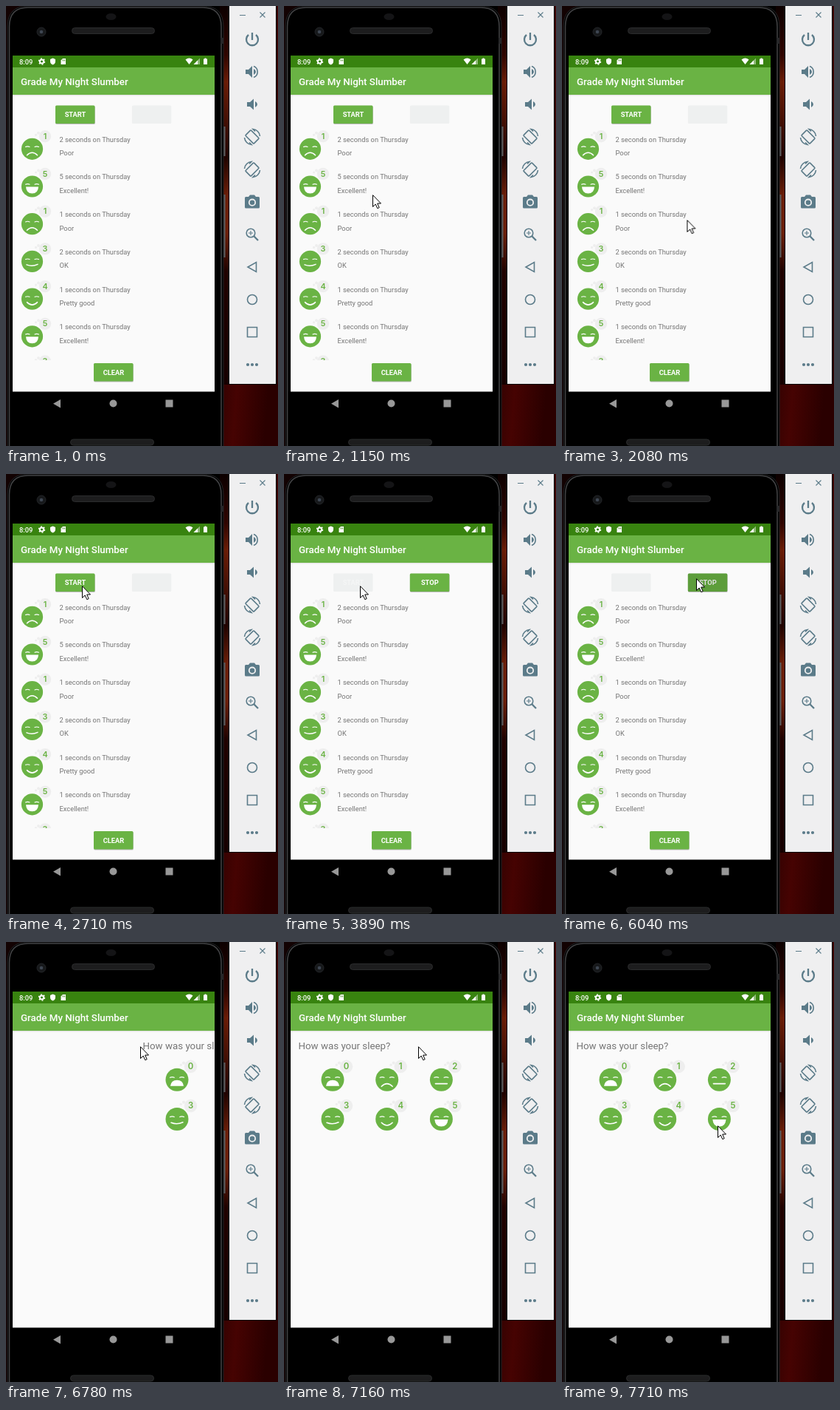
Recreate the animation shown at these times as an HTML page. Size 369 by 595 pixels, loop 8 s.

```html
<!DOCTYPE html>
<html lang="en">
<head>
<meta charset="utf-8">
<title>Sleep log</title>
<style>
html, body { margin: 0; width: 100%; height: 100%; overflow: hidden; background: #000; }
svg { display: block; width: 369px; height: 595px; font: 9.33px Roboto, sans-serif; }
.anim { animation: 8s step-end infinite; }
.caps { font-weight: 700; fill: #fff; text-anchor: middle; }
.digit { font: 600 10.8px Inter, sans-serif; fill: #6ab344; text-anchor: middle; }
.grey { fill: #757575; }
.line { fill: none; stroke: #5b7b89; stroke-width: 1.6; }
.bold { stroke-width: 2.3; }
.thin { stroke-width: 1.1; }
.solid { fill: #5b7b89; }
.feature { fill: none; stroke: #fff; stroke-width: 1.5; stroke-linecap: round; }
.eyes { stroke-width: 1.1; }

#list { animation-name: list; }
#rate { animation-name: slide; }
#start .on { animation-name: start-on; }
#start .ripple { animation-name: start-ripple; }
#start .off-label { animation-name: off-label; }
#stop .on { animation-name: stop-on; }
#stop .ripple { animation-name: stop-ripple; }
#cursor { animation-name: move; }
#halo { animation-name: click; }

@keyframes list { 0% { visibility: visible; } 77.375%, 100% { visibility: hidden; } }
@keyframes slide {
  0% { transform: translateX(300px); }
  81.125% { transform: translateX(255px); }
  82.375% { transform: translateX(231px); }
  84.75% { transform: translateX(166px); }
  86.875% { transform: translateX(98px); }
  89.5%, 100% { transform: none; }
}
@keyframes start-on { 0% { opacity: 1; } 47.875% { opacity: .4; } 48.625%, 100% { opacity: 0; } }
@keyframes stop-on { 0% { opacity: 0; } 47.875% { opacity: .6; } 48.625%, 100% { opacity: 1; } }
@keyframes start-ripple { 0% { opacity: 0; } 44.75%, 100% { opacity: .12; } }
@keyframes stop-ripple {
  0% { opacity: 0; } 72.875% { opacity: .05; } 74.2% { opacity: .09; } 75.5%, 100% { opacity: .12; }
}
@keyframes off-label { 0% { opacity: 1; } 52.5%, 100% { opacity: 0; } }
@keyframes click {
  0% { opacity: 0; } 37.625% { opacity: 1; } 40.75% { opacity: 0; }
  65.125% { opacity: 1; } 67.5%, 100% { opacity: 0; }
}
@keyframes move {
  0% { transform: translate(234px, 700px); }
  4.5% { transform: translate(234px, 562px); animation-timing-function: steps(5); }
  9.4375% { transform: translate(104px, 370px); animation-timing-function: steps(3); }
  12.4% { transform: translate(80px, 280px); }
  13.3875% { transform: translate(104px, 252px); }
  14.375% { transform: translate(120px, 255px); }
  15.375% { transform: translate(138px, 273px); animation-timing-function: steps(3); }
  18.125% { transform: translate(184px, 320px); }
  25% { transform: translate(179px, 309px); animation-timing-function: steps(5); }
  29.925% { transform: translate(131px, 209px); animation-timing-function: steps(4); }
  33.875% { transform: translate(103px, 151px); }
  52.5% { transform: translate(110px, 150px); animation-timing-function: steps(7); }
  59.5% { transform: translate(182px, 140px); }
  65.125% { transform: translate(182px, 141px); }
  91.5% { transform: translate(185px, 152px); animation-timing-function: steps(6); }
  96.375%, 100% { transform: translate(211px, 248px); }
}
</style>
</head>
<body>
<svg viewBox="0 0 369 595">
  <defs>
    <linearGradient id="wall" x1="0" y1="0" x2="1" y2=".6">
      <stop offset="0" stop-color="#120000"/><stop offset=".6" stop-color="#460302"/><stop offset="1" stop-color="#2a0000"/>
    </linearGradient>
    <linearGradient id="gap" x1="0" y1="0" x2="0" y2="1">
      <stop offset="0" stop-color="#0c0000"/><stop offset=".13" stop-color="#300500"/>
      <stop offset=".2" stop-color="#6a1c06"/><stop offset=".3" stop-color="#461004"/>
      <stop offset=".4" stop-color="#200300"/><stop offset=".5" stop-color="#6a1e08"/>
      <stop offset=".6" stop-color="#6a1e08"/><stop offset=".7" stop-color="#200200"/><stop offset="1" stop-color="#160000"/>
    </linearGradient>
    <linearGradient id="shade" x1="0" y1="0" x2="0" y2="1">
      <stop offset="0" stop-opacity=".12"/><stop offset="1" stop-opacity="0"/>
    </linearGradient>
    <clipPath id="screen"><path d="M9 120H283V521.500H9Z"/></clipPath>
    <clipPath id="rows-clip"><path d="M9 160H283V479H9Z"/></clipPath>
    <g id="rotate" class="line">
      <rect x="-5.200" y="-8" width="10.400" height="16" rx="1" transform="rotate(-45)"/>
      <path class="line" d="M10.500 -1A10.500 10.500 0 0 0 1 -10.500L4 -7.500M-10.500 1A10.500 10.500 0 0 0 -1 10.500L-4 7.500"/>
    </g>
  </defs>

  <path d="M290 0H369V595H290Z" fill="url(#wall)"/>
  <path d="M290 0H304V512H290Z" fill="url(#gap)"/>
  <path d="M0 0H30V595H0Z" fill="#120202"/>

  <!-- phone -->
  <path d="M294 163h3.500v40H294zM294 255h3.500v85H294z" fill="#5d5d5f"/>
  <path d="M2 595V28Q2 0 30 0H267Q295 0 295 28V595" fill="#000" stroke="#222325"/>
  <path d="M4.500 595V28Q4.500 2 30 2H267Q292 2 292 28V595" fill="none" stroke="#434446" stroke-width="1.500"/>
  <path d="M291 43h4v8h-4z" fill="#27282a"/>
  <ellipse cx="142.500" cy="14.500" rx="7" ry="4.500" fill="#141416"/>
  <circle cx="48" cy="35" r="6" fill="#17191b" stroke="#232528"/>
  <circle cx="48" cy="35" r="2.300" fill="#3e4652"/>
  <rect x="89.500" y="29.500" width="112" height="8" rx="4" fill="#1d1d1e" stroke="#2b2c2d"/>
  <rect x="87.500" y="586" width="113" height="8" rx="4" fill="#1d1d1e" stroke="#2b2c2d"/>

  <!-- screen -->
  <path d="M9 120H283V521.500H9Z" fill="#fafafa"/>
  <path d="M9 67H283V83H9Z" fill="#38830f"/>
  <path d="M9 83H283V120H9Z" fill="#6ab344"/>
  <path d="M9 120H283V122H9Z" fill="url(#shade)"/>
  <g fill="#fff" font-weight="500">
    <text x="18" y="78.500">8:09</text>
    <text x="20" y="106.800" font-size="13.330">Grade My Night Slumber</text>
    <circle cx="48.500" cy="75" r="2.600" fill="none" stroke="#fff" stroke-width="2"/>
    <circle cx="48.500" cy="75" r="4" fill="none" stroke="#fff" stroke-width="1.400" stroke-dasharray="1.900 2.290"/>
    <path d="M63.500 70.500L67 72V75Q67 78 63.500 79.500Q60 78 60 75V72Z"/>
    <path d="M77 71H81V79H74.500V73.500Z"/>
    <path d="M76.800 72.500v2M78.300 72.500v2M79.700 72.500v2" stroke="#38830f" stroke-width=".700"/>
    <path d="M243.500 72.500Q248.500 68.500 253.500 72.500L248.500 79Z"/>
    <path d="M263 70.500V79H254.500Z" opacity=".45"/><path d="M260 73.500V79H254.500Z"/>
    <path d="M268 71.500h1.500v-1h2v1H273V79h-5z"/>
  </g>
  <g fill="#989898">
    <path d="M74 532V543.500L64 537.700Z"/><circle cx="145.500" cy="537.500" r="5"/><path d="M216.500 532.500h10v10h-10z"/>
  </g>

  <g clip-path="url(#screen)">
    <g id="list" class="anim">
      <g id="start"></g><g id="stop"></g><g id="clear"></g>
      <g id="rows" clip-path="url(#rows-clip)"></g>
    </g>
    <g id="rate" class="anim">
      <text class="grey" x="19.500" y="145" font-size="13.330">How was your sleep?</text>
      <g id="grid"></g>
    </g>
  </g>

  <!-- emulator toolbar -->
  <path d="M302 0H367V512H302Z" fill="#080202"/>
  <path d="M303 0H366V511H303Z" fill="#efeff0"/>
  <path class="line thin" d="M317 12.500h8M344.500 8.500l7 7M351.500 8.500l-7 7"/>
  <g transform="translate(334 45)"><path class="line bold" d="M0 -9V1M-5 -6A8 8 0 1 0 5 -6"/></g>
  <g transform="translate(334 89)">
    <path class="solid" d="M-9 -3H-5L0 -8V8L-5 3H-9Z"/>
    <path class="solid" d="M2 -4Q5 -2.500 5 0T2 4Z"/><path class="line" d="M2 -7.500A8 8 0 0 1 2 7.500"/>
  </g>
  <g transform="translate(334 133)">
    <path class="solid" d="M-7 -3H-3L2 -7.500V7.500L-3 3H-7Z"/><path class="solid" d="M4 -4Q7 -2.500 7 0T4 4Z"/>
  </g>
  <use href="#rotate" transform="translate(334 177)"/>
  <use href="#rotate" transform="translate(334 221) scale(-1 1)"/>
  <g transform="translate(334 265)">
    <path class="solid" d="M-8.500 -7H-5L-3 -9.500H3L5 -7H8.500Q10 -7 10 -5.500V7Q10 8.500 8.500 8.500H-8.500Q-10 8.500 -10 7V-5.500Q-10 -7 -8.500 -7Z"/>
    <circle r="4.200" cy=".700" fill="none" stroke="#efeff0" stroke-width="1.800"/>
  </g>
  <g transform="translate(332 307)" class="line">
    <circle r="5.800"/><path class="bold" d="M4.300 4.300L10 10"/><path class="thin" d="M-3 0H3M0 -3V3"/>
  </g>
  <path class="line" d="M339.500 346.500V359.500L328 353Z"/>
  <circle class="line" cx="334" cy="397" r="6.500"/>
  <path class="line" d="M327.500 434.500h13v13h-13z"/>
  <g class="solid"><circle cx="328" cy="485" r="2.100"/><circle cx="334" cy="485" r="2.100"/><circle cx="340" cy="485" r="2.100"/></g>

  <g id="cursor" class="anim">
    <circle id="halo" class="anim" r="12" fill="#ff0" fill-opacity=".47"/>
    <path d="M.500 .700V16.500L4.200 13L6.800 18.700L9.200 17.600L6.700 12H11.500Z" fill="#fff" stroke="#000"/>
  </g>
</svg>
<script>
const $ = id => document.getElementById(id);
const line = d => `<path class="feature" d="${d}"/>`;
const fill = d => `<path fill="#fff" d="${d}"/>`;

const mouths = [
  fill('M-8.5 8Q-7.5 .5 0 .5T8.5 8Z'),
  line('M-7 8.5Q0 1.5 7 8.5'),
  line('M-7.5 5H7.5'),
  line('M-7.5 4.5Q0 7.5 7.5 4'),
  line('M-7 4.5Q0 11.5 7 4.5'),
  fill('M-8.5 .5H8.5Q8 9.5 0 9.5T-8.5 .5Z')
];
const eyes = '<path class="feature eyes" d="M-9 -2.8Q-6 -4 -3.500 -2.800M3.500 -2.800Q6 -4 9 -2.800"/>';

const face = (score, x, y, size = 1) => `
  <g transform="translate(${x} ${y}) scale(${size})">
    <circle cx="5" cy="-19" r="1.6" fill="#eee"/><circle cx="8.5" cy="-21.5" r="2" fill="#eee"/>
    <circle cx="17.5" cy="-17" r="8.2" fill="#eee"/>
    <text class="digit" x="17.5" y="-13.4">${score}</text>
    <circle r="14.6" fill="#6ab344"/>${eyes}${mouths[score]}
  </g>`;

const button = (label, x, y, off) => {
  const box = `x="${x}" y="${y}" width="53.5" height="24.5" rx="1.5"`;
  const text = `<text class="caps" x="${x + 27}" y="${y + 15.5}">${label}</text>`;
  return `<rect ${box} fill="#eef0f0"/>
    ${off ? `<g class="anim off-label" fill-opacity=".4">${text}</g>` : ''}
    <g class="anim on">
      <rect ${box} transform="translate(.3 1)" fill-opacity=".25"/>
      <rect ${box} fill="#6ab344"/>${text}
      <rect class="anim ripple" ${box} opacity="0"/>
    </g>`;
};

$('start').innerHTML = button('START', 67, 134.5, true);
$('stop').innerHTML = button('STOP', 170.8, 134.5);
$('clear').innerHTML = button('CLEAR', 119, 483);

const words = ['Very bad', 'Poor', 'So-so', 'OK', 'Pretty good', 'Excellent!'];
const nights = [[2, 1], [5, 5], [1, 1], [2, 3], [1, 4], [1, 5], [2, 3]];
$('rows').innerHTML = nights.map(([secs, score], i) => {
  const y = 193.3 + i * 50.7;
  return `${face(score, 35.5, y)}
    <text class="grey" x="72.5" y="${y - 9.6}">${secs} seconds on Thursday</text>
    <text class="grey" x="72.5" y="${y + 8.8}">${words[score]}</text>`;
}).join('');

$('grid').innerHTML = mouths.map((_, i) =>
  face(i, 66 + i % 3 * 73.7, 186.3 + (i > 2 ? 53.2 : 0), 1.06)).join('');
</script>
</body>
</html>
```
